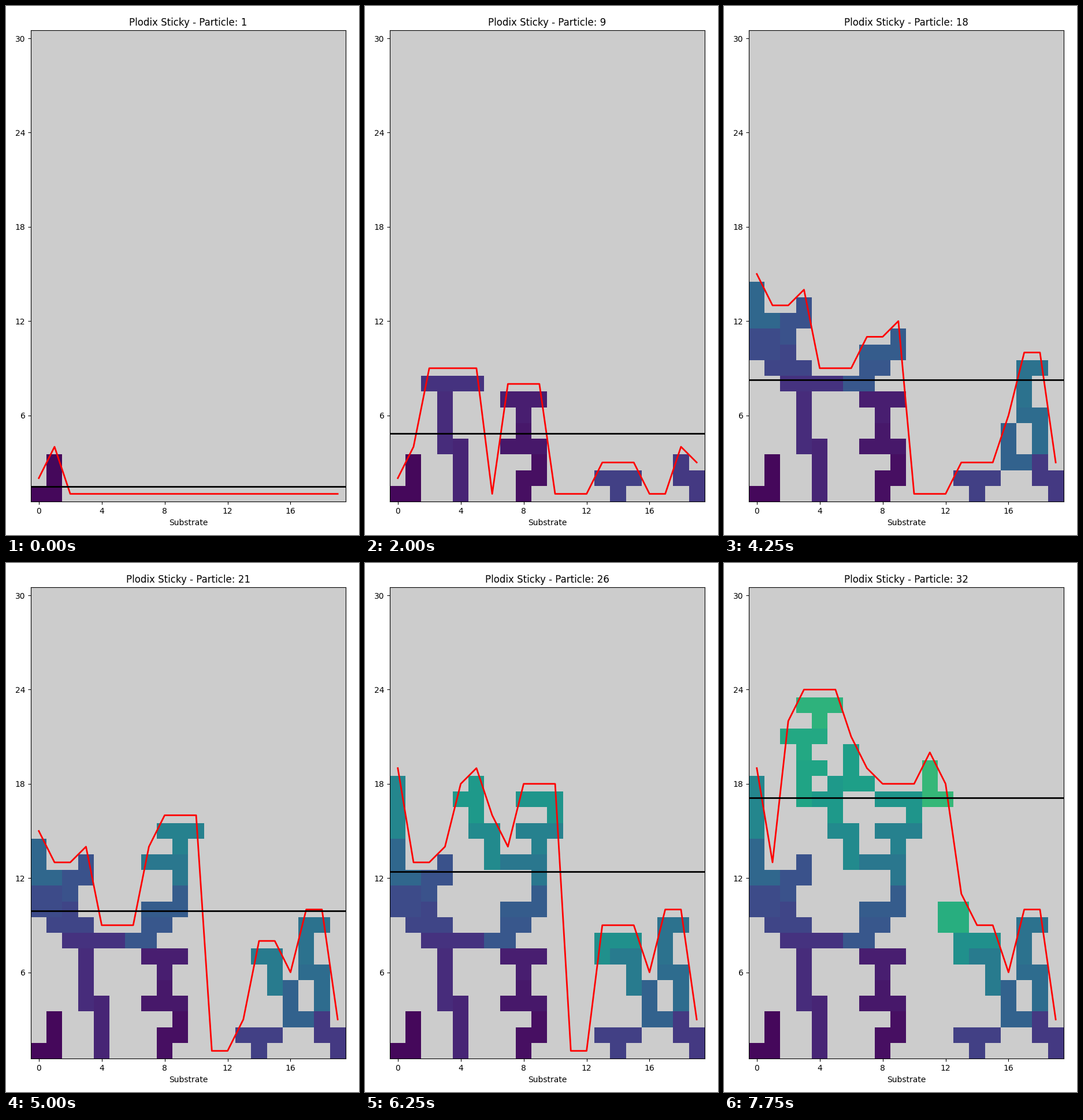
Recreate the animation shown at these times as a matplotlib script. Size 611x917 px, loop 8 s.

```python
import numpy as np
import matplotlib.pyplot as plt
from matplotlib.animation import FuncAnimation

W, H, DPI = 611, 917, 100
COLS, ROWS = 20, 30
CELL = 27.23
LEFT, BOTTOM = 43.15, 57.67
STEPS, STEP_MS = 32, 250
VMAX = 48

# Shapes as rows from top to bottom
SHAPES = {
    "I": "#/#/#/#",
    "I flat": "####",
    "O": "##/##",
    "T up": ".#./###",
    "T down": "###/.#.",
    "T left": ".#/##/.#",
    "S": ".##/##.",
    "S tall": ".#/##/#.",
    "Z tall": "#./##/.#",
    "J": ".#/.#/##",
    "J flat": "###/..#",
    "L": "#./#./##",
    "L flat": "..#/###",
    "L down": "###/#..",
    "hook left": "##/.#/.#",
    "hook right": "##/#./#.",
}

# Shape and leftmost column of each particle
DROPS = [
    ("J", 0), ("S tall", 8), ("T up", 7), ("T down", 7), ("I", 4), ("I", 3),
    ("I flat", 2), ("Z tall", 18), ("T down", 13), ("T up", 1), ("O", 0),
    ("S tall", 2), ("S", 6), ("L flat", 7), ("L", 16), ("L", 0),
    ("hook left", 17), ("hook right", 17), ("J flat", 7), ("hook left", 14),
    ("T down", 8), ("I", 0), ("hook left", 5), ("L down", 13), ("J flat", 8),
    ("T left", 4), ("L", 6), ("hook right", 3), ("T down", 2), ("O", 12),
    ("T down", 3), ("L", 11), ("T up", 13),
]


def cells(name):
    rows = SHAPES[name].split("/")[::-1]
    return [(r, c) for r, row in enumerate(rows)
            for c, mark in enumerate(row) if mark == "#"]


def touches(grid, r, c):
    """True if the cell lies on the floor or next to a filled cell."""
    return (r == 0 or grid[r - 1, c] > 0
            or (c > 0 and grid[r, c - 1] > 0)
            or (c < COLS - 1 and grid[r, c + 1] > 0))


def drop(grid, name, col, value):
    """Lower a shape until any of its cells sticks."""
    shape = cells(name)
    base = ROWS - 1 - max(r for r, _ in shape)
    while not any(touches(grid, base + r, col + c) for r, c in shape):
        base -= 1
    out = grid.copy()
    for r, c in shape:
        out[base + r, col + c] = value
    return out


def surface(grid):
    level = np.arange(2, ROWS + 2)[:, None]
    return np.where(grid > 0, level, 1).max(axis=0)


grids = []
grid = np.zeros((ROWS, COLS))
for n, (name, col) in enumerate(DROPS, 1):
    grid = drop(grid, name, col, n)
    grids.append(grid)
heights = [surface(g) for g in grids]

fig = plt.figure(figsize=(W / DPI, H / DPI), dpi=DPI, facecolor="white")
ax = fig.add_axes([LEFT / W, BOTTOM / H, COLS * CELL / W, ROWS * CELL / H],
                  facecolor="0.8")
image = ax.imshow(np.ma.masked_equal(grids[0], 0), cmap="viridis",
                  vmin=0, vmax=VMAX, origin="lower", aspect="auto",
                  interpolation="nearest",
                  extent=(-0.5, COLS - 0.5, 0.5, ROWS + 0.5))
outline, = ax.plot(range(COLS), heights[0], color="red", lw=2)
mean_line = ax.axhline(1, color="black", lw=2)
ax.set_xlim(-0.5, COLS - 0.5)
ax.set_ylim(0.5, ROWS + 0.5)
ax.set_xticks(range(0, COLS, 4))
ax.set_yticks(range(6, ROWS + 1, 6))
ax.set_xlabel("Substrate")
title = ax.set_title("")


def update(i):
    image.set_data(np.ma.masked_equal(grids[i], 0))
    outline.set_ydata(heights[i])
    # The mean level runs one particle ahead
    mean = heights[i + 1].mean()
    mean_line.set_ydata([mean, mean])
    title.set_text(f"Plodix Sticky - Particle: {i + 1}")
    return image, outline, mean_line, title


anim = FuncAnimation(fig, update, frames=STEPS, interval=STEP_MS,
                     repeat=True, repeat_delay=0, blit=False)
plt.show()
```
